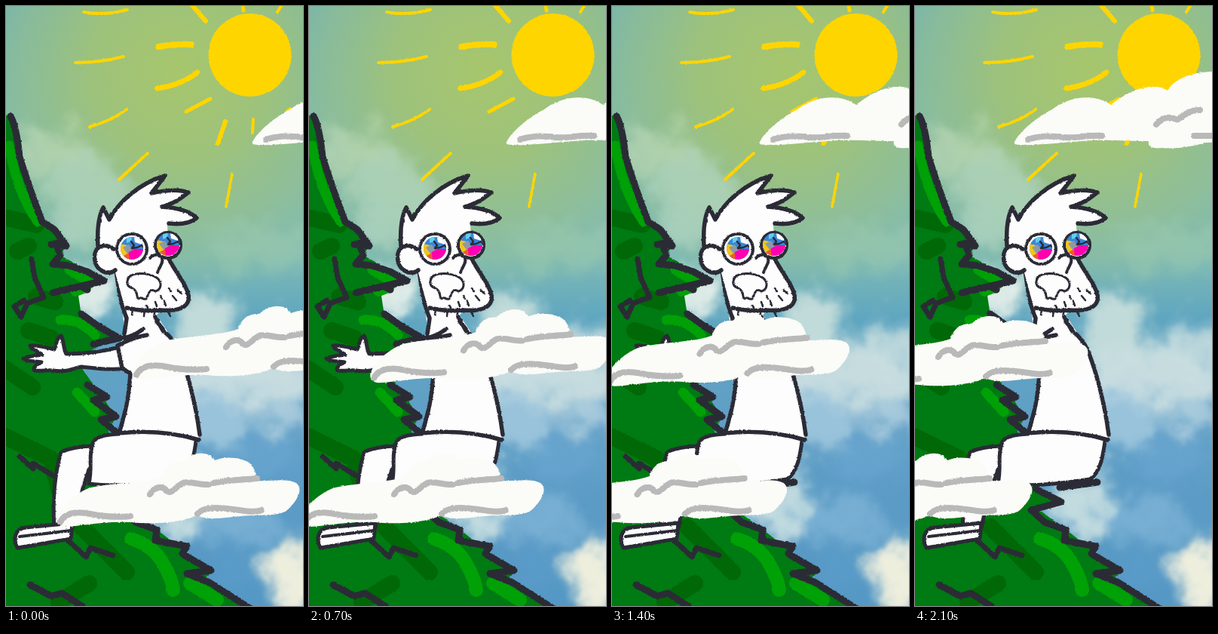
An HTML page for the animation above (2200 ms loop, 394 by 795 pixels).

```html
<!DOCTYPE html>
<html lang="en">
<head>
<meta charset="utf-8">
<title>Drifting clouds</title>
<style>
html, body { margin: 0; width: 100%; height: 100%; overflow: hidden; background: #6aa9c4; }
svg { display: block; width: 100vw; height: 100vh; }
path { stroke-linecap: round; stroke-linejoin: round; }
.ink { fill: none; stroke: #2b2b36; stroke-width: 5.5; }
.thin { stroke-width: 2.5; }
.bold { stroke-width: 9; }
.skin { fill: #fdfdfd; stroke: #2b2b36; stroke-width: 5; }
.dark { fill: none; stroke: #006806; stroke-width: 22; }
.lime { fill: none; stroke: #00a007; stroke-width: 13; }
.puff { fill: #fbfbf8; }
.shade { fill: none; stroke: #b9b9b9; stroke-width: 8; }
</style>
</head>
<body>
<svg viewBox="0 0 394 795" preserveAspectRatio="none">
<defs>
  <linearGradient id="sky" x2="0" y2="1">
    <stop offset="0" stop-color="#6fb1b5"/>
    <stop offset=".3" stop-color="#82bbae"/>
    <stop offset=".42" stop-color="#7fbab4"/>
    <stop offset=".52" stop-color="#5fa6c0"/>
    <stop offset=".68" stop-color="#609fc6"/>
    <stop offset="1" stop-color="#5598c5"/>
  </linearGradient>
  <radialGradient id="glow" gradientUnits="userSpaceOnUse" cx="230" cy="85" r="300">
    <stop offset="0" stop-color="#a7c66c"/>
    <stop offset=".4" stop-color="#a0c377" stop-opacity=".92"/>
    <stop offset=".7" stop-color="#98c18a" stop-opacity=".6"/>
    <stop offset="1" stop-color="#90c09a" stop-opacity="0"/>
  </radialGradient>
  <filter id="mist" filterUnits="userSpaceOnUse" x="-60" y="-60" width="514" height="915" color-interpolation-filters="sRGB">
    <feGaussianBlur stdDeviation="11" result="soft"/>
    <feTurbulence type="fractalNoise" baseFrequency=".025" numOctaves="5" seed="4" result="n"/>
    <feDisplacementMap in="soft" in2="n" scale="60" xChannelSelector="R" yChannelSelector="G"/>
    <feGaussianBlur stdDeviation="1.5"/>
  </filter>
  <filter id="rough" color-interpolation-filters="sRGB">
    <feTurbulence type="fractalNoise" baseFrequency=".35" numOctaves="2" seed="2" result="n"/>
    <feDisplacementMap in="SourceGraphic" in2="n" scale="2.5" xChannelSelector="R" yChannelSelector="G"/>
  </filter>
  <g id="long" filter="url(#rough)">
    <path class="puff" d="M0 484C4 468 28 448 46 443C80 436 115 437 140 428C146 410 158 408 168 408C180 396 202 393 210 407C225 400 250 404 258 412C264 420 266 428 264 434C285 435 305 430 318 437C328 445 320 460 306 473C295 482 270 478 245 481C215 484 200 486 186 480C165 490 125 492 98 489C60 487 30 495 10 495Q0 494 0 484Z"/>
    <path class="shade" d="M5 489C12 474 30 475 45 478S80 483 98 481M124 452C130 442 140 440 146 447S160 440 168 437S190 440 202 439M208 437C225 433 245 433 266 431M187 478C195 468 215 469 235 472S262 476 272 473"/>
  </g>
  <g id="high" filter="url(#rough)">
    <path class="puff" d="M0 180C8 165 30 147 50 137C72 120 105 115 128 131C150 113 170 106 186 107Q196 107 203 112C215 92 245 86 280 86V180L255 181C235 186 215 190 196 188C186 189 176 188 178 179C150 179 120 176 90 179C60 181 30 185 8 184Q-2 184 0 180Z"/>
    <path class="shade" d="M18 177C35 171 50 172 66 174S95 170 116 172M188 157C198 145 208 147 214 150S226 137 246 138M238 172H280"/>
  </g>
  <g id="iris">
    <clipPath id="round"><circle r="15"/></clipPath>
    <g clip-path="url(#round)">
      <circle r="16" fill="#3b86d8"/>
      <path fill="#f5c518" d="M-16-6L-6-4L-4 9L-12 14L-18 6Z"/>
      <path fill="#8d9aa5" d="M-12-1L-4-5L1 3L-6 7Z"/>
      <path fill="#ff00b0" d="M-4 5L4 1L17 1V17H-8Z"/>
      <path fill="#ef5a28" d="M-11 10L-4 6L-3 17H-9Z"/>
      <path fill="#5fd0ee" d="M-7-14L0-16L-1-9L-7-7Z"/>
      <path fill="#fff" d="M3-15L14-12L13-5L4-8Z"/>
      <path class="ink thin" d="M-1-9L3-4L0 0L7-1L13-4L16-1"/>
    </g>
  </g>
</defs>

<rect width="394" height="795" fill="url(#sky)"/>
<rect width="394" height="400" fill="url(#glow)"/>
<g id="haze" filter="url(#mist)"></g>

<g id="sun" fill="none" stroke="#ffd500" filter="url(#rough)">
  <circle cx="323.5" cy="65" r="55" fill="#ffd500" stroke="none"/>
</g>

<g filter="url(#rough)">
  <path fill="#007a12" d="M-5 145L8 145L18 195L32 240L50 285L80 318L72 330L130 364L96 384L100 410L150 440L128 449L112 457L102 482L147 545L135 560L160 640L195 655L165 668L198 692L240 725L272 750L262 762L325 800H-5Z"/>
  <path class="dark" d="M-2 280L40 290M15 325L30 318M40 385L65 392M-2 480L35 505M60 440L30 430M-2 570L60 600L70 640M100 690L160 750M70 790L110 765"/>
  <path class="lime" d="M4 185Q14 245 42 286M72 416Q98 414 118 436M94 512L118 538M84 350L112 366M92 378L106 374"/>
  <path class="lime" style="stroke-width:18" d="M166 706Q195 715 208 738T222 774M244 765L280 787"/>
  <path class="ink bold" d="M6 146Q14 160 18 200Q34 250 48 286L64 296L80 318L60 316M66 314L72 330L62 342L84 344L108 352L130 364L62 380M100 372L108 376M100 408L122 424L150 440L116 448M108 502L134 518L116 522L146 544L126 548L148 566"/>
  <path class="ink" style="stroke-width:7" d="M34 335L38 360L50 386L28 394L20 412L11 398L24 390M18 597L36 613V606L62 622M80 706L106 730L112 718L142 728"/>
  <path class="ink bold" d="M160 640L194 657L154 668L172 684L200 694L198 708L240 716L234 726L272 748L240 752L270 764L322 797M32 767L60 782L74 778L102 796M192 638L242 631"/>
</g>

<g filter="url(#rough)">
  <path class="skin" d="M114 583Q88 584 73 591C66 615 61 645 64 692H88C92 668 100 645 110 614"/>
  <path class="skin" d="M88 685L26 691C10 693 10 708 15 718L86 706Z"/>
  <path class="ink thin" d="M18 703L86 695" style="stroke-width:4"/>
  <path class="skin" d="M150 567C132 568 118 570 115 580C109 596 115 610 110 633C150 638 200 632 232 627C247 618 250 592 253 570"/>
  <path class="skin" d="M150 452C125 459 100 461 80 461C76 455 77 443 73 437C66 440 67 450 64 455C52 452 40 449 32 450C32 455 44 458 48 462C40 463 28 464 23 467C28 472 40 470 47 472C40 475 35 480 38 483C46 484 56 482 62 483C80 486 90 480 100 478C120 480 140 483 156 480"/>
  <path fill="#fdfdfd" d="M148 345L158 436L148 452L153 480L165 487L150 567L256 573L248 510L230 455L200 410L215 380Z"/>
  <path class="ink" d="M146 350C149 372 151 392 160 414L157 434M187 436Q168 439 148 450L154 480L165 487C163 520 158 540 150 566Q205 560 256 575M153 440Q166 440 182 428M198 412L208 430Q222 440 230 458C242 490 252 530 257 568M200 418L208 428"/>
  <path fill="#fdfdfd" d="M122 318C121 300 122 280 129 267L137 283C148 262 175 235 211 225L193 248Q225 241 242 247Q224 262 207 266Q240 268 253 281Q240 291 214 288L216 335C224 352 245 375 242 390C238 404 218 404 205 403L158 401L144 350C136 356 121 352 118 338Q116 325 122 318Z"/>
  <path class="ink" d="M122 318C121 300 122 280 129 267L137 283C148 262 175 235 211 225L193 248Q225 241 242 247Q224 262 207 266Q240 268 253 281Q240 291 216 288M143 322C128 312 115 320 118 338C121 352 136 357 145 350M216 335C224 352 245 375 242 390C238 404 218 404 205 403Q182 405 160 400"/>
  <path class="ink thin" d="M168 402L167 409M184 403L183 411M197 401V408M213 402L218 411M186 396L188 400M198 392L200 398M210 391L212 397M221 384L226 390M227 376L233 381M205 384L207 388M216 374L219 378"/>
  <path class="skin" style="stroke-width:3" d="M161 365C162 352 185 352 200 360C208 366 206 376 198 378C192 374 190 378 186 388C180 390 180 384 176 388C172 386 176 378 168 374Q160 372 161 365Z"/>
  <circle class="skin" style="stroke-width:4" cx="167" cy="322" r="20"/>
  <circle class="skin" style="stroke-width:4" cx="215" cy="317" r="17"/>
  <path class="skin" style="stroke-width:4" d="M191 334C197 326 210 331 207 340L201 353"/>
</g>
<use href="#iris" x="167" y="321"/>
<use href="#iris" x="215" y="316"/>

<use id="top" href="#high"/>
<use id="middle" href="#long"/>
<use id="low" href="#long"/>
</svg>
<script>
const $ = id => document.getElementById(id);

function add(parent, tag, attrs) {
  const el = document.createElementNS("http://www.w3.org/2000/svg", tag);
  for (const key in attrs) el.setAttribute(key, attrs[key]);
  $(parent).append(el);
}

// Painted haze: x, y, rx, ry, colour, opacity
for (const [cx, cy, rx, ry, fill, opacity] of [
  [60, 190, 60, 28, "#c3dcbb", .6], [110, 255, 60, 55, "#b4d6c2", .7],
  [340, 320, 80, 30, "#9ccab0", .6], [112, 385, 38, 30, "#e6f0ea", .95],
  [265, 425, 50, 45, "#d3e4df", .85], [320, 490, 105, 36, "#d2e3e3", .9],
  [375, 445, 45, 25, "#dce9e4", .7], [275, 550, 50, 40, "#a3c9de", .85],
  [370, 545, 40, 25, "#b9d5e2", .8], [350, 600, 60, 26, "#6aa5d0", .7],
  [222, 655, 36, 48, "#c8dfe1", .95], [305, 680, 60, 32, "#7fb3d6", .8],
  [300, 745, 40, 20, "#5b9cca", .8], [386, 755, 38, 56, "#eeeedd", 1]
]) add("haze", "ellipse", { cx, cy, rx, ry, fill, opacity });

// Sun rays: path, width
for (const [d, width] of [
  ["M103 8Q130 13 161 5", 4], ["M92 75Q126 75 156 67", 4],
  ["M111 160Q140 152 160 137", 4], ["M150 230L188 195", 4],
  ["M202 54Q225 50 246 51", 8], ["M201 109Q232 105 254 88", 7],
  ["M239 140L271 123", 5], ["M246 -2L265 20", 6], ["M314 -2L315 6", 5],
  ["M360 8L366 -2", 4], ["M281 182L291 153", 6], ["M328 150L327 168", 4],
  ["M372 140L377 136", 4], ["M300 222L292 266", 3.5]
]) add("sun", "path", { d, "stroke-width": width });

// Shared drift: [step, progress]
const drift = [[0, 0], [3, .121], [7, .333], [9, .424], [12, .573], [17, .821], [21, 1]];

function progress(step) {
  const i = Math.max(1, drift.findIndex(k => k[0] >= step));
  const [a, from] = drift[i - 1], [b, to] = drift[i];
  return from + (to - from) * (step - a) / (b - a);
}

const place = (id, x, y) => $(id).setAttribute("transform", `translate(${x} ${y})`);

function draw(now) {
  const p = progress(Math.floor(now % 2200 / 100));
  place("top", 327 - 195 * p, 0);
  place("middle", 168 - 261 * p, 13 * p);
  place("low", 67 - 234 * p, 195);
  requestAnimationFrame(draw);
}
draw(performance.now());
</script>
</body>
</html>
```
